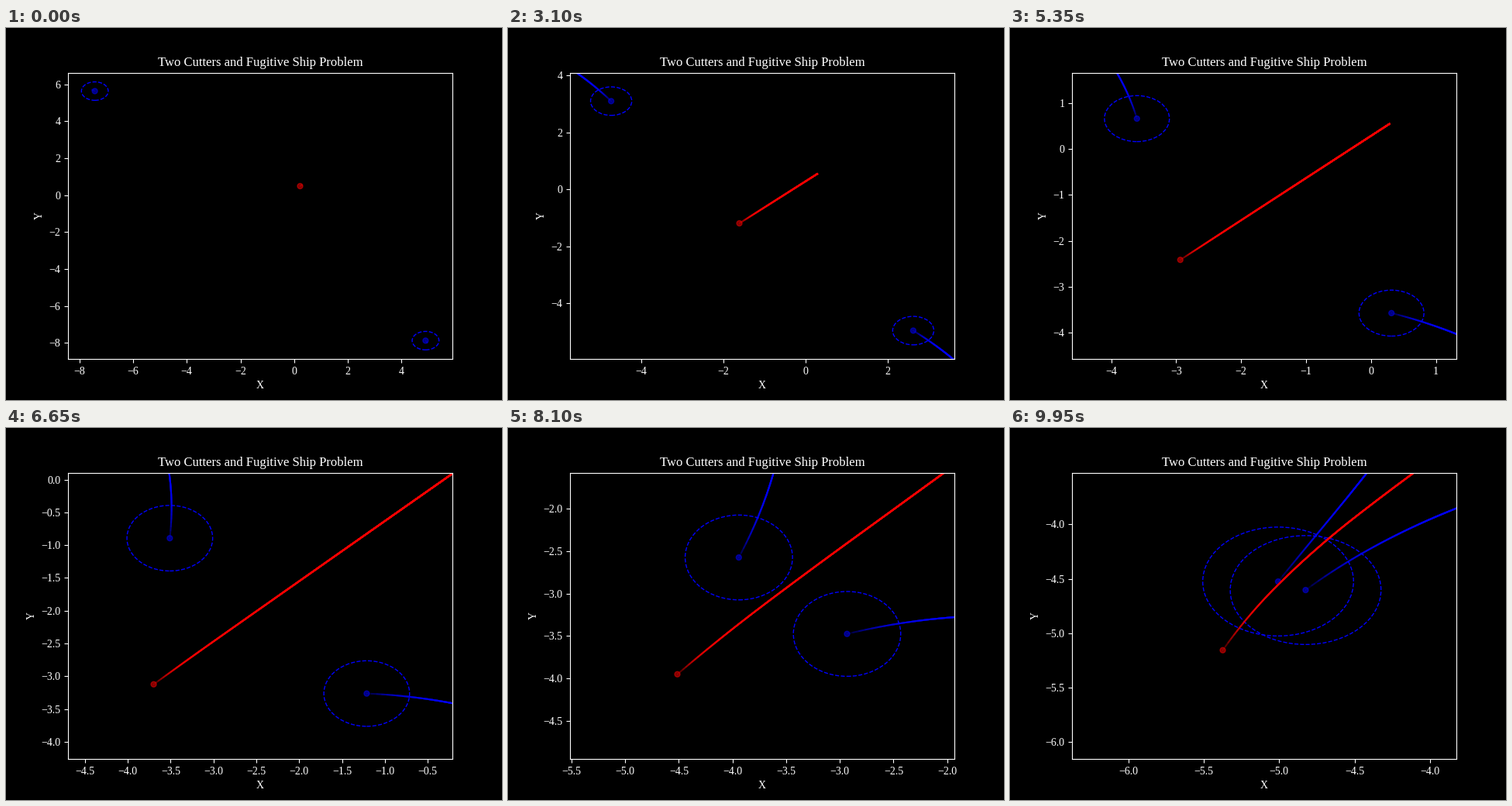
Animation, 640 px wide and 480 px high, one loop 10 s. Source, as a matplotlib script:

```python
import numpy as np
import matplotlib.pyplot as plt
from matplotlib.animation import FuncAnimation

FRAMES, INTERVAL = 200, 50
LEAD = 2               # steps already sailed when the first frame shows
SHIP_SPEED, CUTTER_SPEED = 0.0401, 0.0601
CAPTURE_RADIUS = 0.5
MARGIN = 1
COLORS = ["red", "blue", "blue"]

# Every step overlays the whole wake once more, so fresh wake stays dim.
# Beyond FRESH steps, one stronger layer stands for STRIDE faint ones.
LAYER_ALPHA = 0.2
FRESH, STRIDE = 20, 6
OLD_ALPHA = 1 - (1 - LAYER_ALPHA) ** STRIDE


def sail():
    """Positions [step, vessel, xy]: fugitive first, then the two pursuers."""
    steps = FRAMES + LEAD
    turn = np.interp(np.arange(steps) - LEAD,
                     [0, 107, 133, 162, 182, 199],
                     [42.5, 42.6, 43.6, 47.2, 54, 63])
    heading = np.radians(turn + 180)
    pos = np.empty((steps, 3, 2))
    pos[0] = [(0.283, 0.545), (-7.527, 5.705), (4.9585, -7.985)]
    for i in range(1, steps):
        h = heading[i]
        ship = pos[i - 1, 0] + SHIP_SPEED * np.array([np.cos(h), np.sin(h)])
        cutters = pos[i - 1, 1:]
        aim = ship - cutters
        aim /= np.linalg.norm(aim, axis=1, keepdims=True)
        pos[i, 0] = ship
        pos[i, 1:] = cutters + CUTTER_SPEED * aim
    return pos


track = sail()

plt.style.use("dark_background")
plt.rcParams["font.family"] = "Liberation Serif"
fig, ax = plt.subplots(figsize=(6.4, 4.8), dpi=100)
ax.set_title("Two Cutters and Fugitive Ship Problem")
ax.set_xlabel("X")
ax.set_ylabel("Y")

dots = ax.scatter(*track[LEAD].T, s=25, c=COLORS, alpha=0.5, zorder=1)
circles = [plt.Circle(p, CAPTURE_RADIUS, fill=False, color="blue",
                      linestyle="--", linewidth=1) for p in track[LEAD, 1:]]
for circle in circles:
    ax.add_patch(circle)

ages = [*range(FRESH), *range(FRESH + STRIDE // 2, len(track), STRIDE)]
layers = [(vessel, age, ax.plot([], [], color=color, linewidth=1.5,
                                alpha=LAYER_ALPHA if age < FRESH else OLD_ALPHA)[0])
          for vessel, color in enumerate(COLORS) for age in ages]


def update(frame):
    now = frame + LEAD
    here = track[now]
    for vessel, age, line in layers:
        line.set_visible(age < now)
        if age < now:
            line.set_data(*track[:now - age + 1, vessel].T)
    dots.set_offsets(here)
    for circle, center in zip(circles, here[1:]):
        circle.center = center
    low, high = here.min(axis=0) - MARGIN, here.max(axis=0) + MARGIN
    ax.set_xlim(low[0], high[0])
    ax.set_ylim(low[1], high[1])
    return [dots, *circles]


anim = FuncAnimation(fig, update, frames=FRAMES, interval=INTERVAL,
                     repeat=True, repeat_delay=0, blit=False)
plt.show()
```
